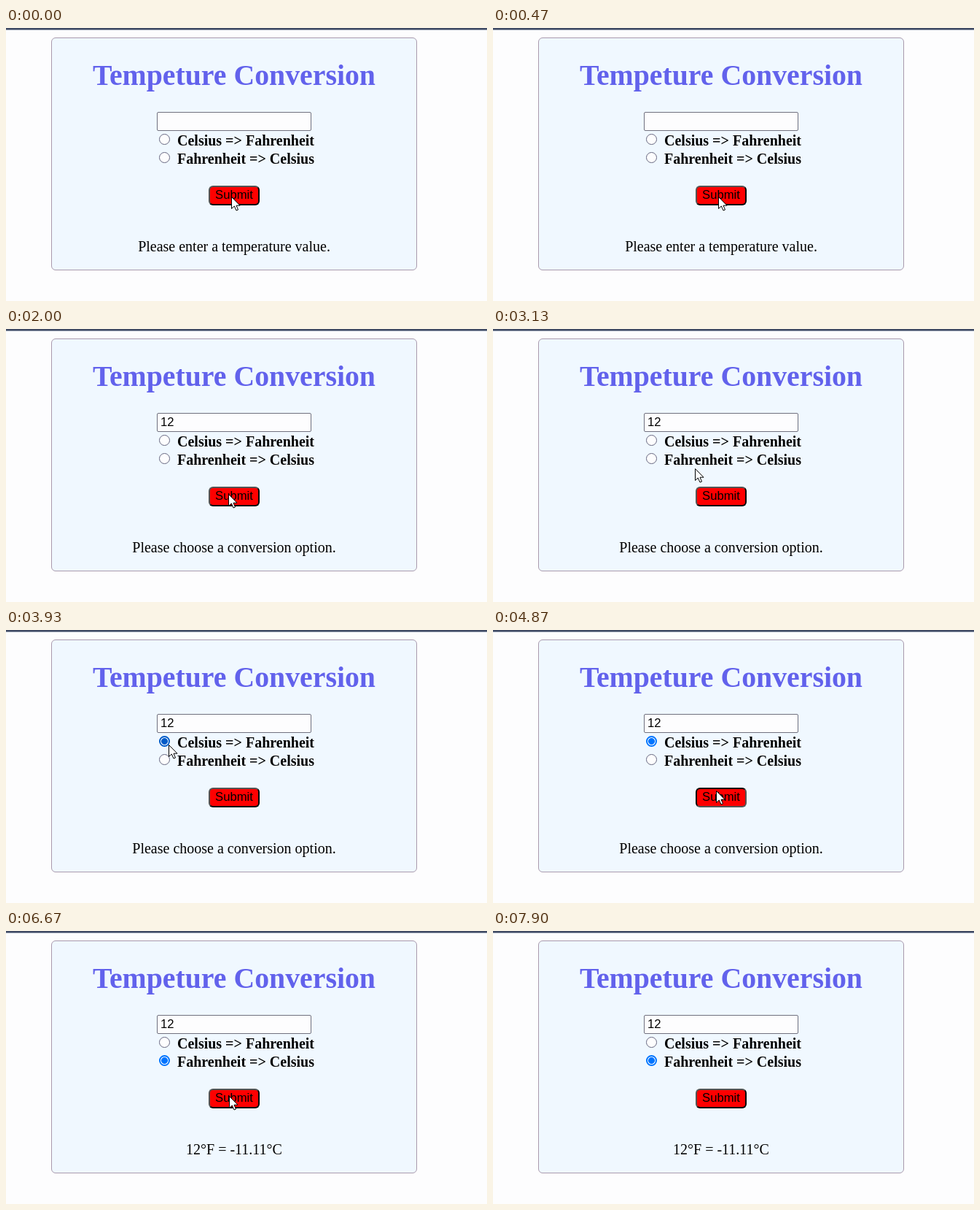
These frames come from a looping animation (660x374 px, 7.93 s). An HTML page:

```html
<!DOCTYPE html>
<html lang="en">
<head>
<meta charset="utf-8">
<title>Temperature conversion</title>
<style>
html, body { margin: 0; width: 100%; height: 100%; overflow: hidden; background: #fdfdfe; }
div { position: absolute; box-sizing: border-box; }
.bar { left: 0; top: 0; width: 660px; height: 3px; background: linear-gradient(#3f4a63 2px, #8790a4 2px); }
.panel { left: 62px; top: 13px; width: 502px; height: 319px; background: #f0f8ff; border: 1px solid #a99aad; border-radius: 6px; }
.field { left: 207px; top: 115px; width: 212px; height: 26px; background: #fdfdfe; border: 1px solid #70707e; border-radius: 2px; }
.field.focus { border: 2px solid #101010; border-radius: 3px; }
.radio { left: 210px; width: 15px; height: 15px; background: #fdfdfe; border: 1px solid #666680; border-radius: 50%; }
.radio.on { border: 2px solid #0075ff; background: radial-gradient(circle, #0075ff 4.1px, #fdfdfe 4.7px); }
.radio.on.hover { border-color: #005cc8; background: radial-gradient(circle, #005cc8 4.1px, #fdfdfe 4.7px); }
.button { left: 278px; top: 216px; width: 70px; height: 27px; background: #f00; border: 2px outset #000; border-radius: 6px; }
.button.down { border-style: inset; }
svg { position: absolute; left: 0; top: 0; }
.serif { font: 20px "Liberation Serif", "Times New Roman", serif; }
.sans { font: 16.667px "Liberation Sans", Arial, sans-serif; }
.bold { font-weight: bold; }
.title { font-size: 39.8px; fill: #6262ec; }
.mid { text-anchor: middle; }
</style>
</head>
<body>
<div class="bar"></div>
<div class="panel"></div>
<div class="field" id="field"></div>
<div class="radio" id="toF" style="top:145px"></div>
<div class="radio" id="toC" style="top:170px"></div>
<div class="button" id="button"></div>
<svg width="660" height="374" viewBox="0 0 660 374">
  <text class="serif bold title mid" x="313" y="78">Tempeture Conversion</text>
  <text class="serif bold" x="235" y="161">Celsius =&gt; Fahrenheit</text>
  <text class="serif bold" x="235" y="186">Fahrenheit =&gt; Celsius</text>
  <text class="sans mid" x="313" y="234">Submit</text>
  <text class="serif mid" id="message" x="313" y="306"></text>
  <text class="sans" id="value" x="212" y="133"></text>
  <path id="caret" d="M0 119v18" stroke="#000"/>
  <g id="spinner">
    <path d="M396 118h19v20h-19z" fill="#efeff2"/>
    <path d="M400.500 127l5-6 5 6zM400.500 130l5 6 5-6z" fill="#505058"/>
  </g>
  <g id="pointer">
    <path id="arrow" d="M.5 .5V16.500L4.300 13 7 19 9.500 18 7 12.200H12z" fill="#fff" stroke="#000" stroke-linejoin="round"/>
    <path id="beam" d="M-3 -8.500h2.500l.5.5.5-.5H3M0 -8V8M-3 8.500h2.500L0 8l.5.5H3" fill="none" stroke="#000"/>
  </g>
</svg>
<script>
const LOOP = 7930;
const $ = id => document.getElementById(id);

// Pointer stops: time, x, y
const path = [
  [0, 309, 231], [560, 309, 231], [840, 290, 128], [1060, 290, 128],
  [1260, 277, 171], [1340, 277, 171], [1590, 305, 226], [2650, 305, 226],
  [3020, 277, 191], [3160, 277, 191], [3420, 217, 152], [3850, 217, 152],
  [4350, 306, 220], [5000, 306, 220], [5270, 219, 174], [5920, 219, 174],
  [6120, 306, 226], [LOOP, 306, 226]
];
const messages = [
  [0, "Please enter a temperature value."],
  [1760, "Please choose a conversion option."],
  [4930, "12°C = 53.60°F"],
  [6420, "12°F = -11.11°C"]
];
const values = [[0, ""], [1080, "1"], [1200, "12"]];
const choices = [[0, ""], [3520, "toF"], [5310, "toC"]];
const presses = [[1670, 1760], [4830, 4930], [6320, 6420]];

const at = (steps, t) => steps.filter(s => s[0] <= t).pop()[1];
const within = (t, a, b) => t >= a && t < b;
const show = (id, on) => $(id).setAttribute("visibility", on ? "visible" : "hidden");

function pointerAt(t) {
  const i = path.findIndex(p => p[0] > t);
  const [t0, x0, y0] = path[i - 1], [t1, x1, y1] = path[i];
  const u = (t - t0) / (t1 - t0), e = u * u * (3 - 2 * u);
  return [Math.round(x0 + (x1 - x0) * e), Math.round(y0 + (y1 - y0) * e)];
}

function draw(t) {
  const [x, y] = pointerAt(t);
  const inside = (l, top, w, h) => within(x, l, l + w) && within(y, top, top + h);
  const overField = inside(207, 115, 212, 26);
  const focus = within(t, 880, 1670);
  const value = at(values, t), choice = at(choices, t);

  $("message").textContent = at(messages, t);
  $("value").textContent = value;
  $("field").classList.toggle("focus", focus);
  $("button").classList.toggle("down", presses.some(p => within(t, ...p)));
  for (const [id, top] of [["toF", 145], ["toC", 170]]) {
    $(id).classList.toggle("on", choice === id);
    $(id).classList.toggle("hover", inside(210, top, 15, 15));
  }
  $("caret").setAttribute("transform", `translate(${212.5 + value.length * 9.27} 0)`);
  show("caret", focus);
  show("spinner", focus || overField);

  const visible = t < 6960;
  $("pointer").setAttribute("transform", `translate(${x} ${y})`);
  show("arrow", visible && !overField);
  show("beam", visible && overField);
}

const start = performance.now();
function tick() {
  draw((performance.now() - start) % LOOP);
  requestAnimationFrame(tick);
}
tick();
</script>
</body>
</html>
```
